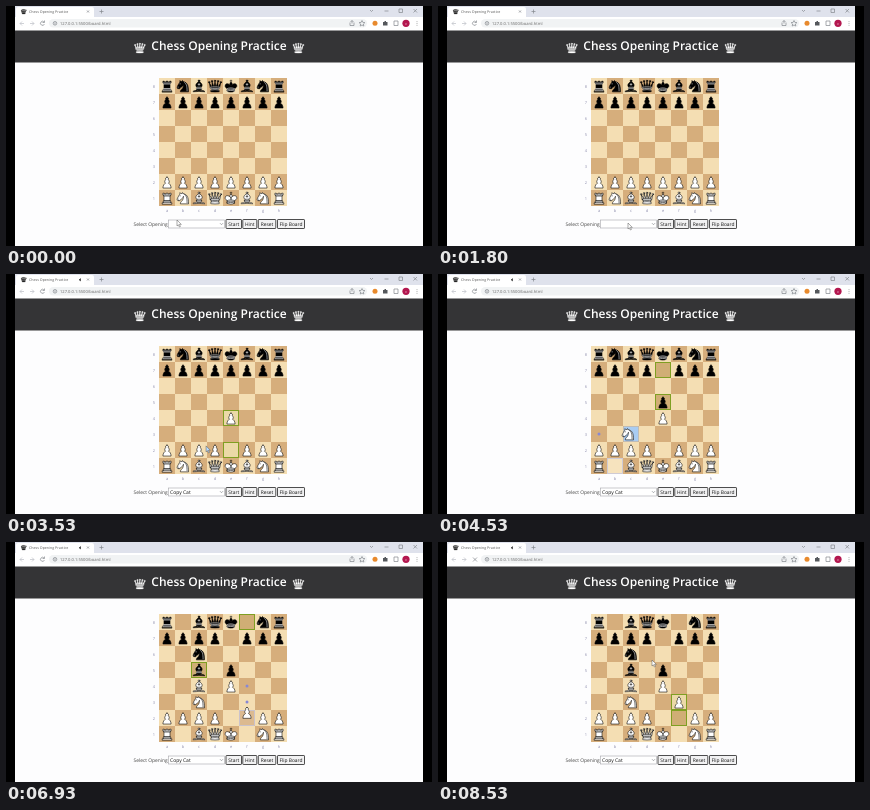
Write an HTML page that moves like this. It is 426x240 px and loops after 8.59 s.

```html
<!DOCTYPE html>
<html lang="en">
<head>
<meta charset="utf-8">
<title>Chess Opening Practice</title>
<style>
html, body { margin: 0; width: 100%; height: 100%; overflow: hidden; background: #000; }
svg { display: block; width: 100vw; height: 100vh; }
text { font-family: "Open Sans", "Noto Sans", sans-serif; text-rendering: geometricPrecision; }
.white { fill: #fff; stroke: #000; --detail: #000; }
.black { fill: #000; stroke: #000; --detail: #fff; }
.crown { fill: #fff; stroke: #fff; --detail: #343436; }
.crown, .crown * { stroke-width: 1.2; }
.detail { fill: none; stroke: var(--detail); }
.piece { stroke-width: 1.6; stroke-linejoin: round; stroke-linecap: round; }
.icon { fill: none; stroke: #85888e; stroke-width: .7; }
.pale { stroke: #bcbfc6; }
.mark { fill: #9cb43a; fill-opacity: .1; stroke: #7f9f22; stroke-width: 1; }
</style>
</head>
<body>
<svg viewBox="0 0 426 240" preserveAspectRatio="none">
  <defs>
    <g id="P" class="piece"><path d="M22.5 9a4 4 0 0 0-3.2 6.4A6.5 6.5 0 0 0 18.4 26C15.4 27 11 31.6 11 39.5h23C34 31.6 29.6 27 26.6 26a6.5 6.5 0 0 0-.9-10.6A4 4 0 0 0 22.5 9z"/></g>
    <g id="N" class="piece">
      <path d="M22 10c10.5 1 16.5 8 16 29H15c0-9 10-6.5 8-21"/>
      <path d="M24 18c.4 3-5.5 7.4-8 9-3 2-2.8 4.3-5 4-1-.9 1.4-3 0-3-1 0 .2 1.2-1 2-1 0-4 1-4-4 0-2 6-12 6-12s1.9-1.9 2-3.5c-.7-1-.5-2-.5-3 1-1 3 2.5 3 2.5h2s.8-2 2.5-3c1 0 1 3 1 3"/>
      <path class="detail" d="M14.5 16v.8M9 25.5v.3M27 13c5 3 7 9 7 23"/>
    </g>
    <g id="B" class="piece">
      <path d="M9 36c3.4-1 10 .4 13.5-2 3.4 2.4 10 1 13.5 2l3 2c-.7 1-1.6 1-3 .5-3.4-1-10 .5-13.5-1-3.4 1.5-10 0-13.5 1-1.4.5-2.3.5-3-.5z"/>
      <path d="M15 32c2.5 2.5 12.5 2.5 15 0v-2c0-2.5-2.5-4-2.5-4 5.5-1.5 6-11.5-5-15.5-11 4-10.5 14-5 15.5 0 0-2.5 1.5-2.5 4z"/>
      <circle cx="22.5" cy="8" r="2.5"/>
      <path class="detail" d="M17.5 26h10M15 30h15M22.5 15.5v5M20 18h5"/>
    </g>
    <g id="R" class="piece">
      <path d="M9 39v-3h3v-4l2-2.5V17l-3-3V9h4v2h5V9h5v2h5V9h4v5l-3 3v12.5l2 2.5v4h3v3z"/>
      <path class="detail" d="M12 35.5h21M13 31.5h19M14 29.5h17M14 17h17M12 14h21"/>
    </g>
    <g id="Q" class="piece">
      <path d="M9 26l-2.5-12.5L14 25l.3-14 5.2 13.5 3-14.5 3 14.5L30.7 11 31 25l7.5-11.5L36 26c0 2-1.5 2-2.5 4-1 1.5-1 1-.5 3.5 1.5 1 1 2.5 1 2.5 1.5 1.5 0 2.5 0 2.5-6.5 1-16.5 1-23 0 0 0-2-1-.5-2.5 0 0 0-1.500 1.500-2.500.5-2.500.5-2-.5-3.500-1-2-2.500-2-2.500-4z"/>
      <path class="detail" d="M9.500 26c8-1.500 18-1.500 26 0M11.500 30c4-1 18-1 22 0M12 33.500c6-1 15-1 21 0"/>
      <circle cx="6" cy="12" r="2"/><circle cx="14" cy="9" r="2"/><circle cx="22.5" cy="8" r="2"/><circle cx="31" cy="9" r="2"/><circle cx="39" cy="12" r="2"/>
    </g>
    <g id="K" class="piece">
      <path d="M22.5 12V6M20 8h5M22.5 25s4.5-7.5 3-10.5c0 0-1-2.5-3-2.5s-3 2.5-3 2.5c-1.5 3 3 10.5 3 10.5"/>
      <path d="M11.5 37c5.5 3.5 15.5 3.5 21 0v-7s9-4.5 6-10.5c-4-6.5-13.5-3.5-16 4V27v-3.5c-3.5-7.5-13-10.5-16-4-3 6 5 10.5 5 10.5z"/>
      <path class="detail" d="M11.5 30c5.5-3 15.5-3 21 0M11.5 33.5c5.5-3 15.5-3 21 0M11.5 37c5.5-3 15.5-3 21 0"/>
    </g>
  </defs>

  <rect width="426" height="240"/>
  <rect x="9" width="408" height="240" fill="#fdfdfe"/>
  <rect x="9" width="408" height="11" fill="#dfe2ec"/>
  <path d="M10 11V3q0-2 2-2h74q2 0 2 2v8z" fill="#fff"/>
  <use href="#Q" class="black" transform="translate(14.5 2.5) scale(.14)"/>
  <text x="23" y="7.3" font-size="3.6" fill="#555">Chess Opening Practice</text>
  <path class="icon" d="M81 4.500l2 2m0-2l-2 2M93.500 5.500h4m-2-2v4M364 4l1.500 1.500L367 4M378.500 5h4M393 3h3.500v3.500H393zM407.500 3l3.500 3.500m0-3.500l-3.500 3.500"/>
  <rect x="9" y="11" width="408" height="13.5" fill="#fff"/>
  <rect x="43" y="13" width="318" height="8.5" rx="4.2" fill="#f1f3f4"/>
  <path class="icon pale" d="M18 17.500h-4m2-2l-2 2 2 2M24 17.500h4m-2-2l2 2-2 2"/>
  <circle class="icon" cx="49" cy="17.3" r="1.8"/>
  <path class="icon" d="M49 16.300v2M344 16.500v3h4v-3m-2 1v-3m-1.500 1.500l1.500-1.500 1.500 1.500M356 14.500l.9 1.900 2 .2-1.500 1.400.4 2-1.800-1-1.800 1 .4-2-1.500-1.400 2-.2zM388 15h4v4.500h-4z"/>
  <text x="54" y="18.9" font-size="4.1" fill="#666">127.0.0.1:5500/board.html</text>
  <circle cx="369" cy="17.3" r="2.5" fill="#e88a2d"/>
  <path d="M377 16h1.500v-1h1.500v1h1.500v3.500H377z" fill="#55585c"/>
  <circle cx="400" cy="17.3" r="3.6" fill="#b3174f"/>
  <text x="400" y="18.7" font-size="3.6" fill="#fff" text-anchor="middle">c</text>
  <path d="M411 15.300v.8m0 1v.8m0 1v.8" stroke="#888" stroke-width=".8"/>
  <g id="tabState"></g>

  <rect x="9" y="24.5" width="408" height="32" fill="#343436"/>
  <text x="213" y="43.7" font-size="12" font-weight="600" fill="#fff" text-anchor="middle">Chess Opening Practice</text>
  <use href="#Q" class="crown" transform="translate(127.300 35.500) scale(.29)"/>
  <use href="#Q" class="crown" transform="translate(285.800 35.500) scale(.29)"/>
  <g id="board"></g>
  <g id="game"></g>
  <text x="127.5" y="220" font-size="4.9" fill="#444">Select Opening</text>
  <rect x="162.5" y="214" width="56" height="8" fill="#fff" stroke="#a5a5aa" stroke-width=".6"/>
  <path class="icon" d="M214 217.200l1.500 1.500 1.500-1.500"/>
  <text id="choice" x="164" y="220" font-size="5" fill="#111"></text>
  <g id="buttons"></g>
  <g id="modal">
    <rect x="9" y="24.5" width="408" height="215.5" fill-opacity=".4"/>
    <rect x="111" y="86" width="204" height="44.5" fill="#fff"/>
    <text x="202" y="104.5" font-size="9.9" font-weight="600" fill="#111" text-anchor="middle">Wrong Move! Try Again</text>
    <circle cx="269.5" cy="102" r="9.5" fill="#c8070c" stroke="#4d080a" stroke-width=".8"/>
    <path d="M263.500 97.500l4 1.500m8-1.500l-4 1.500M264.500 108q5-5.500 10 0" fill="none" stroke="#3d0506" stroke-width="1.2" stroke-linecap="round"/>
    <circle cx="266" cy="101" r="1.2"/><circle cx="273" cy="101" r="1.2"/>
    <g id="retry"></g>
  </g>
  <path id="cursor" d="M0 0v6l1.400-1.200 1 2.200 1-.5-1-2.100h1.900z" stroke="#555" stroke-width=".5"/>
</svg>
<script>
const LOOP = 8590, STEP = 200 / 3, CELL = 16, LEFT = 153, TOP = 72;
const el = id => document.getElementById(id);
const corner = sq => [LEFT + CELL * (sq.charCodeAt(0) - 97), TOP + CELL * (8 - sq[1])];
const center = sq => corner(sq).map(v => v + CELL / 2);

const cell = (sq, attrs) => {
  const [x, y] = corner(sq);
  return `<rect x="${x + .5}" y="${y + .5}" width="15" height="15" ${attrs}/>`;
};
const piece = (kind, side, x, y) =>
  `<use href="#${kind}" class="${side}" transform="translate(${x} ${y}) scale(${CELL / 45})"/>`;
const button = (label, x, y, w) =>
  `<rect x="${x}" y="${y}" width="${w}" height="9" rx=".6" fill="#f2f2f3" stroke="#222" stroke-width=".8"/>
   <text x="${x + w / 2}" y="${y + 6.2}" font-size="4.9" fill="#111" text-anchor="middle">${label}</text>`;

// Moves: pick = drag start (white only), drop = landing time
const moves = [
  { from: "e2", to: "e4", pick: 2700, drop: 3050, hints: ["e3", "e4"] },
  { from: "e7", to: "e5", drop: 3600 },
  { from: "b1", to: "c3", pick: 4150, drop: 4700, hints: ["a3", "c3"] },
  { from: "b8", to: "c6", drop: 5150 },
  { from: "f1", to: "c4", pick: 5500, drop: 6150, hints: ["e2", "d3", "c4", "b5", "a6"] },
  { from: "f8", to: "c5", drop: 6550 },
  { from: "f2", to: "f3", pick: 6800, drop: 7130, hints: ["f3", "f4"] }
];

// Pointer stops: time, x, y
const path = [
  [0, 171, 214], [330, 171, 214], [1000, 175, 188], [1530, 190, 217], [1950, 190, 217],
  [2270, 227, 217], [2530, 225, 185], [2700, 225, 176], [3050, 225, 144], [3550, 200, 172],
  [4150, 177, 192], [4530, 190, 160], [4700, 193, 160], [5500, 241, 192], [6000, 197, 146],
  [6150, 193, 144], [6800, 241, 176], [7130, 241, 160], [7400, 241, 160], [7800, 217, 111],
  [8250, 214, 118], [LOOP, 214, 118]
];

function pointer(t) {
  const i = Math.max(1, path.findIndex(p => p[0] >= t));
  const [t0, x0, y0] = path[i - 1], [t1, x1, y1] = path[i];
  const u = (t - t0) / (t1 - t0), e = u * u * (3 - 2 * u);
  return [x0 + (x1 - x0) * e, y0 + (y1 - y0) * e];
}

function startPosition() {
  const men = {};
  [..."RNBQKBNR"].forEach((kind, i) => {
    const file = "abcdefgh"[i];
    men[file + 1] = [kind, "white"];
    men[file + 2] = ["P", "white"];
    men[file + 7] = ["P", "black"];
    men[file + 8] = [kind, "black"];
  });
  return men;
}

function drawBoard() {
  let out = "";
  for (let i = 0; i < 64; i++) {
    const c = i % 8, r = i >> 3;
    out += `<rect x="${LEFT + c * CELL}" y="${TOP + r * CELL}" width="16" height="16" fill="${(c + r) % 2 ? "#d6ae7c" : "#f4deb3"}"/>`;
  }
  for (let i = 0; i < 8; i++) {
    const label = (x, y, s) => `<text x="${x}" y="${y}" font-size="4" fill="#8f8fae" text-anchor="middle">${s}</text>`;
    out += label(148, 81.5 + i * CELL, 8 - i) + label(161 + i * CELL, 205.5, "abcdefgh"[i]);
  }
  el("board").innerHTML = out;
  el("buttons").innerHTML = button("Start", 220, 213.5, 15.5) + button("Hint", 236.8, 213.5, 14) +
    button("Reset", 252.3, 213.5, 17.5) + button("Flip Board", 271.5, 213.5, 27);
  el("retry").innerHTML = button("Try Again", 200, 114.5, 26);
}

function drawGame(t, [px, py]) {
  const men = startPosition();
  let last, held;
  for (const m of moves) {
    if (t >= m.drop) {
      men[m.to] = men[m.from];
      delete men[m.from];
      last = m;
    } else if (t >= m.pick) held = m;
  }
  let out = last ? cell(last.from, 'class="mark"') + cell(last.to, 'class="mark"') : "";
  let lifted = "";
  if (held) {
    const over = String.fromCharCode(97 + Math.floor((px - LEFT) / CELL)) + (8 - Math.floor((py - TOP) / CELL));
    out += cell(held.from, 'fill="#fff" fill-opacity=".15" stroke="#c6c6dc" stroke-width=".8"');
    if (over !== held.from) out += cell(over, 'fill="#a9ccf2"');
    for (const sq of held.hints) {
      const [x, y] = center(sq);
      out += `<circle cx="${x}" cy="${y}" r="1.5" fill="#8888d4"/>`;
    }
    lifted = piece(...men[held.from], px - 8, py - 8);
    delete men[held.from];
  }
  for (const sq in men) out += piece(...men[sq], ...corner(sq));
  el("game").innerHTML = out + lifted;
  return held;
}

function drawTab(t) {
  const sound = t >= 3050 ? '<path d="M73 5h.8l1.200-1v3.500l-1.200-1H73z" fill="#555"/>' : "";
  const reload = t >= 8400
    ? "M35 15.500l4 4m0-4l-4 4"
    : "M38 16a2 2 0 1 0 .4 2M38.500 14.500v2h-2";
  el("tabState").innerHTML = sound + `<path class="icon" d="${reload}"/>`;
}

function render(t) {
  const at = pointer(t);
  const held = drawGame(t, at);
  drawTab(t);
  el("choice").textContent = t >= 1930 ? "Copy Cat" : "";
  const shown = Math.min((t - 7260) / 130, (8470 - t) / 130);
  el("modal").setAttribute("opacity", Math.max(0, Math.min(1, shown)));
  const cursor = el("cursor");
  cursor.setAttribute("transform", `translate(${at})`);
  cursor.setAttribute("fill", at[1] > 168 && at[1] < 200 ? "#b9dcff" : "#fff");
  cursor.setAttribute("visibility", held ? "hidden" : "visible");
}

let shownStep = -1;
function tick() {
  const step = Math.floor((performance.now() % LOOP + 5) / STEP);
  if (step !== shownStep) render(Math.min(LOOP, (shownStep = step) * STEP));
  requestAnimationFrame(tick);
}
drawBoard();
tick();
</script>
</body>
</html>
```
